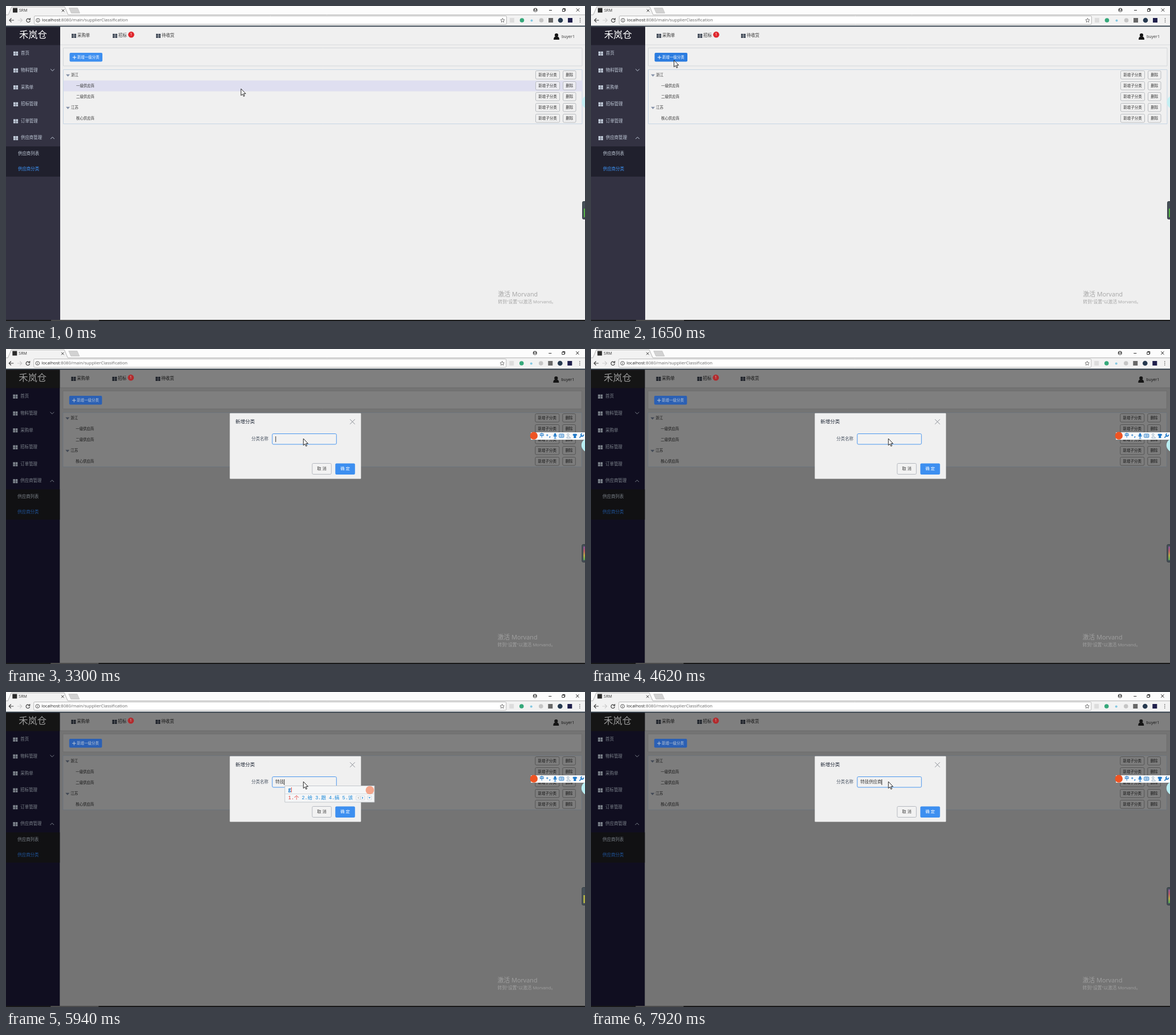
An HTML page with a canvas that plays this animation: 1015x552 px, repeating every 8000 ms.

```html
<!DOCTYPE html>
<html lang="zh-CN">
<head>
<meta charset="utf-8">
<style>
html, body { margin: 0; width: 100%; height: 100%; overflow: hidden; }
canvas { display: block; }
</style>
</head>
<body>
<canvas width="1015" height="552"></canvas>
<script>
const g = document.querySelector('canvas').getContext('2d');
const SANS = '"Open Sans", "Noto Sans CJK SC", sans-serif';
const MONO = '"Liberation Mono", "Noto Sans CJK SC", monospace';
const LOOP = 8000;
const BLUE = '#3d8ff0';

let modal = false;
const shade = (open, dimmed) => modal ? dimmed : open;

// Last entry whose start time has been reached
const at = (steps, t) => steps.filter(s => s[0] <= t).pop();

const pointerSteps = [
  [0, 412, 145], [330, 240, 248], [660, 88, 120], [990, 201, 193],
  [1320, 150, 90], [1650, 145.5, 95], [2640, 566, 170], [2970, 522, 157]
];
const caretSteps = [
  [0, false], [3300, true], [3960, false], [4290, true], [4620, false],
  [5280, true], [6600, false], [7260, true]
];
const typedSteps = [[0, ''], [5940, '特技'], [7920, '特技供应商']];
// start, left, right, pinyin, candidates
const imeSteps = [
  [0],
  [5610, 488, 665, 'teji', '特技 特级 特集 特急'],
  [5940, 490, 647, 'g', '个 给 跟 搞 该'],
  [6270, 490, 647, 'gon', '共 公 工 供 功'],
  [6600, 490, 647, 'gong', '共 公 工 供 功'],
  [7260, 490, 688, "gong'y", '供应 公用 公园 共有 供'],
  [7590, 490, 731, "gong'ying'shang", '供应商 供应上 公营商 供应伤 供'],
  [7920]
];
const meterSteps = [
  [0, 15], [330, 17], [1320, 13], [1650, 15], [2310, 14], [3300, 24],
  [5280, 20], [5940, 14], [6270, 24]
];

function rect(x, y, w, h, fill, stroke, r = 0) {
  g.beginPath();
  g.roundRect(x, y, w, h, r);
  paint(fill, stroke);
}
function circle(x, y, r, fill, stroke) {
  g.beginPath();
  g.arc(x, y, r, 0, 7);
  paint(fill, stroke);
}
function path(d, x, y, fill, stroke, width = 1) {
  g.save();
  g.translate(x, y);
  const p = new Path2D(d);
  if (fill) { g.fillStyle = fill; g.fill(p); }
  if (stroke) { g.strokeStyle = stroke; g.lineWidth = width; g.stroke(p); }
  g.restore();
}
function paint(fill, stroke) {
  if (fill) { g.fillStyle = fill; g.fill(); }
  if (stroke) { g.strokeStyle = stroke; g.lineWidth = 1; g.stroke(); }
}
// Draws text centred on y and returns its right edge
function text(s, x, y, size, color, { align = 'left', weight = 400, font = SANS } = {}) {
  g.font = `${weight} ${size}px ${font}`;
  g.textAlign = align;
  g.textBaseline = 'middle';
  g.fillStyle = color;
  g.fillText(s, x, y);
  return x + g.measureText(s).width;
}
function button(s, x, y, w, h, size, fill, stroke, color) {
  rect(x, y, w, h, fill, stroke, 2);
  text(s, x + w / 2, y + h / 2 + .3, size, color, { align: 'center' });
}

function browser() {
  rect(0, 0, 1030, 15, '#fcfcfc');
  rect(0, 15, 1030, 20, '#f2f2f2');
  path('M0 15H4L10 1H103L109 15H1030', 0, .5, '#f2f2f2', '#b4b4b4');
  path('M0 0H15L19 9H4Z', 110.5, 3.5, '#d2d2d2', '#bdbdbd', .7);
  rect(12, 3.5, 8, 8, '#2b2b2b');
  text('SRM', 23, 7.7, 7, '#333');
  path('M-2.3 -2.3L2.3 2.3M2.3 -2.3L-2.3 2.3', 100, 8, null, '#444');

  circle(928, 7, 3.6, '#555');
  circle(928, 6, 1.2, '#fff');
  rect(926, 8, 4, 1.3, '#fff');
  rect(952, 7, 5, 1, '#333');
  path('M-1.5 -1.5V-2.5H2.5V1.5H1.5M-2.5 -1.5H1.5V2.5H-2.5Z', 978, 7, null, '#333');
  path('M-2.7 -2.7L2.7 2.7M2.7 -2.7L-2.7 2.7', 1002.5, 7, null, '#222');

  path('M4 0H-4M-.5 -3.5L-4 0L-.5 3.5', 10, 25, null, '#444', 1.2);
  path('M-4 0H4M.5 -3.5L4 0L.5 3.5', 24.5, 25, null, '#ccc', 1.2);
  path('M2.6 -1.6A3.2 3.2 0 1 0 3.2 .6M3.4 -4V-1H.4', 39, 25, null, '#444', 1.2);
  rect(49.5, 17.5, 828, 14.5, '#fff', '#b8b8b8', 1.5);
  circle(56, 25, 3.3, null, '#555');
  rect(55.5, 24.5, 1, 2.5, '#555');
  rect(55.5, 22.8, 1, 1, '#555');
  const end = text('localhost', 63, 24.8, 7.65, '#222');
  text(':8080/main/supplierClassification', end, 24.8, 7.65, '#666');
  path('M0 -3.6L1.1 -1.2L3.6 -.9L1.8 .9L2.3 3.4L0 2.2L-2.3 3.4L-1.8 .9L-3.6 -.9L-1.1 -1.2Z', 870.5, 25, null, '#555', .8);

  rect(883, 21, 8, 8, '#ddd');
  circle(904.5, 25, 3.8, '#35a87a');
  circle(921.5, 25.5, 2, '#83c8e2');
  circle(938.5, 25, 3.8, '#c5c5c5');
  rect(951, 21, 8, 8, '#686868');
  circle(972, 25, 4.3, '#26394f');
  rect(985, 21, 8, 8, '#20204c');
  for (const y of [22, 25, 28]) circle(1006.5, y, .8, '#444');
  rect(0, 34.5, 1030, 2, '#2c3a46');
}

function tiles(x, y, color) {
  for (const dx of [0, 4.4]) {
    rect(x + dx, y - 3.6, 3.7, 3.9, color);
    rect(x + dx, y + .6, 3.7, 3, color);
  }
}

function sidebar() {
  const color = shade('#c3cddb', '#7d848c');
  rect(0, 36.5, 95, 515, shade('#333242', '#100e20'));
  rect(0, 36.5, 95, 32, shade('#22212e', '#151515'));
  rect(0, 246, 95, 53, shade('#20202d', '#111113'));
  text('禾岚仓', 23, 52, 16.3, shade('#fff', '#999'), { weight: 500 });
  ['首页', '物料管理', '采购单', '招标管理', '订单管理', '供应商管理'].forEach((s, i) => {
    const y = 83.3 + i * 29.65;
    tiles(13, y, color);
    text(s, 26, y, 7.45, color);
  });
  path('M-3.3 -1.5L0 1.8L3.3 -1.5', 81.5, 112, null, color);
  path('M-3.3 1.5L0 -1.8L3.3 1.5', 81.5, 231.5, null, color);
  text('供应商列表', 21, 259.3, 7.45, color);
  text('供应商分类', 21, 286, 7.45, shade('#3d95fa', '#20559c'));
}

function header() {
  const ink = shade('#333', '#111');
  rect(95, 36.5, 935, 31.5, shade('#f0f0f0', '#7f7f7f'));
  rect(95, 67.5, 935, 1, shade('#d9dce0', '#6b6b6b'));
  for (const [s, x] of [['采购单', 115], ['招标', 187], ['待收货', 263]]) {
    tiles(x, 52.3, shade('#3f4856', '#1c2028'));
    text(s, x + 10, 52.3, 7.45, ink);
  }
  circle(219.5, 50.2, 5.4, shade('#e0282e', '#b32a2d'));
  text('1', 219.5, 50.3, 7, shade('#fff', '#ccc'), { align: 'center' });
  circle(965, 51, 3.1, '#151515');
  path('M-5 5Q-5 0 -2 -.5H2Q5 0 5 5Z', 965, 54, '#151515');
  text('buyer1', 974, 53.7, 7, ink);
}

function addButton(t) {
  const fill = t < 1320 ? BLUE : t < 1650 ? '#5aa2f5' : t < 2310 ? '#2b7ce0' : t < 2640 ? '#3f74b8' : '#2b60b4';
  const ink = shade('#fff', '#bcc6d4');
  rect(111.5, 82, 57.5, 15.5, fill, null, 2);
  path('M-3.3 0H3.3M0 -3.3V3.3', 120, 90, null, ink);
  text('新增一级分类', 125, 90, 6.45, ink);
}

function tree(px, py) {
  const ink = shade('#333', '#161616');
  const panel = shade('#f0f0f0', '#7d7d7d');
  const line = shade('#b9bcc0', '#555');
  rect(100.5, 111.5, 909.5, 95, panel, shade('#c6d5e4', '#6c747c'));
  ['浙江', '一级供应商', '二级供应商', '江苏', '核心供应商'].forEach((s, i) => {
    const top = 111.5 + i * 19, y = top + 9.5;
    const hovered = !modal && px > 101 && py >= top && py < top + 19;
    if (hovered) rect(101, top, 909, 19, '#dfdff0');
    const parent = i % 3 === 0;
    if (parent) path('M0 0H7L3.5 4Z', 105, y - 1.2, shade('#8591a8', '#434a56'));
    text(s, parent ? 114 : 123, y, 6.4, ink);
    const fill = hovered ? '#ededf2' : panel;
    button('新增子分类', 928.5, top + 2, 42, 14.5, 6.5, fill, line, ink);
    button('删除', 976.5, top + 2, 22.5, 14.5, 6.5, fill, line, ink);
  });
}

function dialog(t) {
  const focused = t >= 3300;
  g.save();
  if (t >= 2640) g.translate(0, 1);
  rect(393, 111.5, 230, 115, '#f0f0f0', null, 1);
  text('新增分类', 403, 126.3, 8.5, '#222a38', { weight: 500 });
  path('M-4.3 -4.3L4.3 4.3M4.3 -4.3L-4.3 4.3', 608, 126.5, null, '#8b8f96');
  text('分类名称', 431, 157, 7.45, '#4b5563');
  rect(467.5, 147.5, 112.5, 18.5, '#f2f2f2', focused ? '#4b97ee' : '#b9bfca', 2);
  const end = text(at(typedSteps, t)[1], 473, 157.3, 7.45, '#333');
  if (at(caretSteps, t)[1]) rect(Math.round(end), 152, 1, 10, '#333');
  button('取 消', 537.5, 199.5, 33.5, 19, 7.4, '#f2f2f2', '#b5b9c0', '#444');
  button('确 定', 578, 199.5, 34.5, 19.5, 7.4, BLUE, null, '#fff');
  g.restore();
}

function imeBar() {
  const ink = '#1f78c8';
  rect(921, 146, 110, 13, '#f7f9fb');
  circle(926, 152, 6.7, '#ee5423');
  text('中', 936, 152.3, 8, ink, { weight: 700 });
  circle(949.5, 151, 1.1, null, ink);
  path('M0 0L-1 2.5', 954.5, 153, null, ink, 1.4);
  rect(961.5, 147.5, 3.5, 6, ink, null, 1.7);
  path('M-3 -1Q-3 2.5 0 2.5T3 -1M0 2.5V5M-2 5H2', 963.3, 151.7, null, ink, .9);
  rect(970.5, 149, 8, 6, null, ink, 1);
  path('M0 0H5M0 2H5', 972.2, 151, null, ink, .9);
  circle(986, 150, 1.7, null, '#9db4c8');
  path('M-3 4Q-2 0 1 1L4 4Z', 986.5, 152, null, '#9db4c8');
  path('M-4 -2L-1.5 -3.7Q0 -2.5 1.5 -3.7L4 -2L3 0L2 -.5V4H-2V-.5L-3 0Z', 998, 152, ink);
  path('M-3.5 3.5L1 -1M3.5 -2A2.3 2.3 0 1 1 1 -3.7', 1009.5, 152, null, ink, 1.7);
}

function imePopup([, left, right, pinyin, words]) {
  if (!left) return;
  const ink = '#1686d8';
  rect(left - .5, 164.5, right - left, 28.5, '#f5f6f7', '#c3c8cd');
  rect(left, 178, right - left - 1, 1, '#d5d9dd');
  const end = text(pinyin, left + 5.5, 171.3, 8.6, '#1679cc', { weight: 700 });
  rect(end + .3, 167, 1, 9, '#e65b4c');
  circle(right - 8.5, 172, 7.3, '#f3a58b');
  let x = left + 5.5;
  words.split(' ').forEach((w, i) => {
    x = text(`${i + 1}.${w}`, x, 185.8, 8.5, i ? ink : '#e53935', { font: MONO }) + 5;
  });
  for (const [dx, d, color] of [
    [29, 'M1 -2L-1 0L1 2Z', '#aaa'], [21, 'M-1 -2L1 0L-1 2Z', ink], [9, 'M-2 -1H2L0 1Z', ink]
  ]) {
    rect(right - dx - 3.5, 182, 7, 7, '#fafafa', '#d4dbe2');
    path(d, right - dx, 185.5, color);
  }
}

function edgeWidgets(t) {
  circle(1021.5, 168.5, 12, shade('#c5f0f3', '#b9eef2'));
  rect(1010.5, 342.5, 12, 31, '#465058', '#343c42', 2);
  const h = at(meterSteps, t)[1];
  const fill = g.createLinearGradient(0, 346, 0, 370);
  ['#8b58a8', '#c85a64', '#c3b645', '#4fb557'].forEach((c, i) => fill.addColorStop(i / 3, c));
  rect(1013, 370 - h, 2.5, h, h > 20 ? fill : t >= 5280 ? '#b9b846' : '#58b548');
}

function notice() {
  const color = shade('#a5a5a5', '#a0a0a0');
  text('激活 Morvand', 862.5, 506.5, 10.8, color);
  text('转到"设置"以激活 Morvand。', 862.5, 519, 7.65, color);
}

function draw(t) {
  modal = t >= 2310;
  const [, px, py] = at(pointerSteps, t);
  g.setTransform(1, 0, 0, 1, 0, 0);
  rect(0, 0, 1015, 552, shade('#efefef', '#747474'));
  if (t >= 2640) g.translate(-.7, 0);
  browser();
  header();
  sidebar();
  rect(100.5, 73.5, 909.5, 31.5, shade('#f0f0f0', '#7f7f7f'), shade('#d3d7da', '#6d6d6d'));
  addButton(t);
  tree(px, py);
  if (modal) dialog(t);
  notice();
  if (t >= 3300) imeBar();
  imePopup(at(imeSteps, t));
  edgeWidgets(t);
  rect(0, 550, 1030, 2, '#191919');
  rect(79, 550, 84, 2, '#4c4c4c');
  path('M0 0V11.8L2.7 9.3L4.6 13.4L6.3 12.6L4.5 8.7H8.2Z', px, py, '#fff', '#111', .9);
}

function tick(now) {
  draw(now % LOOP);
  requestAnimationFrame(tick);
}
requestAnimationFrame(tick);
</script>
</body>
</html>
```
